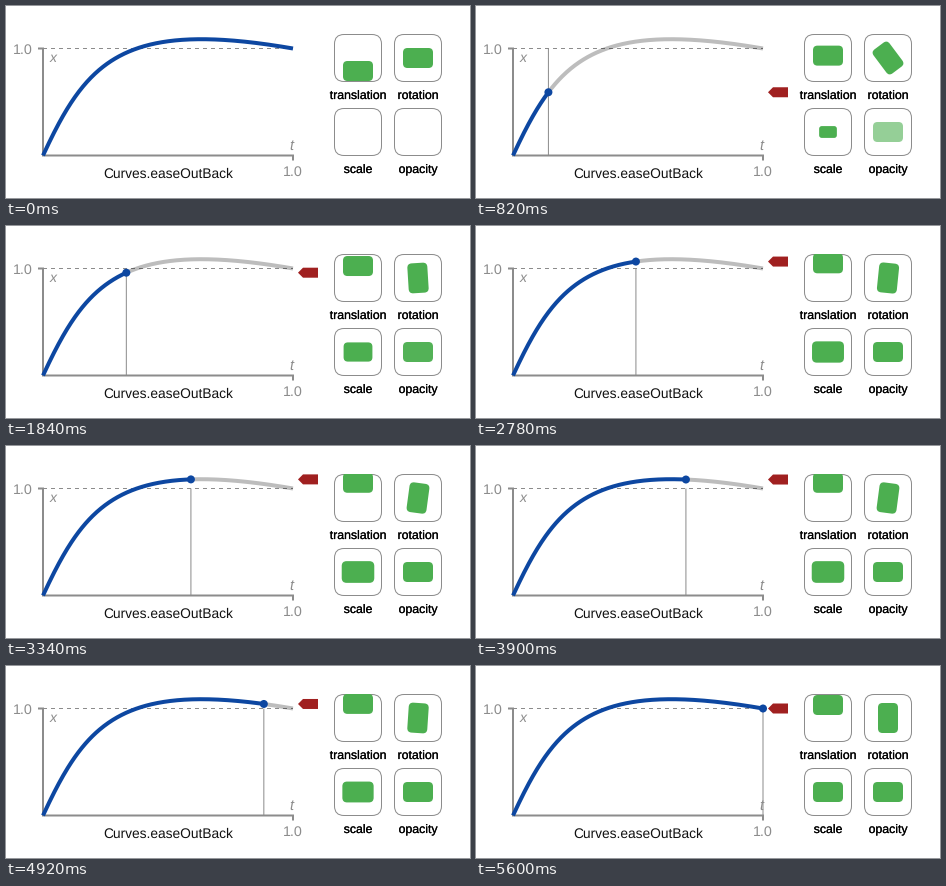
Write a matplotlib script that moves like this. It is 464x192 px and loops after 5620 ms.

```python
import numpy as np
import matplotlib.pyplot as plt
from matplotlib.animation import FuncAnimation
from matplotlib.patches import Circle, FancyBboxPatch, Polygon
from matplotlib.patheffects import withStroke
from matplotlib.transforms import Affine2D

W, H, DPI = 464, 192, 64
PX = 72 / DPI  # points per pixel
TICK = 20      # ms
STEPS = 120

GREY = "#8c8c8c"
SHADE = (0, 0, 0, 0.26)
BLUE = "#0d47a1"
RED = "#a02020"
GREEN = "#4caf50"

LEFT, RIGHT, TOP, BOTTOM = 37, 287, 42.5, 149.5
UNIT = 5

plt.rcParams["font.family"] = "Liberation Sans"
plt.rcParams["text.hinting"] = "none"

fig = plt.figure(figsize=(W / DPI, H / DPI), dpi=DPI, facecolor="white")
ax = fig.add_axes([0, 0, 1, 1])
ax.set(xlim=(0, W), ylim=(H, 0))
ax.axis("off")


def bezier(s, a, b):
    return 3 * (1 - s) ** 2 * s * a + 3 * (1 - s) * s ** 2 * b + s ** 3


S = np.linspace(0, 1, 2001)
CURVE_T = bezier(S, 0.175, 0.32)
CURVE_X = bezier(S, 0.885, 1.275)


def ease_out_back(t):
    return np.interp(t, CURVE_T, CURVE_X)


def to_area(t):
    return (LEFT + t * (RIGHT - LEFT),
            BOTTOM - ease_out_back(t) * (BOTTOM - TOP))


def line(xs, ys, color, width, z, **kw):
    return ax.plot(xs, ys, color=color, lw=width * PX, zorder=z, snap=False,
                   solid_capstyle="butt", **kw)[0]


def label(x, y, text, size, color, ha="center", **kw):
    return ax.text(x, y, text, fontsize=size * PX, color=color, ha=ha,
                   va="baseline", **kw)


def rounded(cx, cy, w, h, r, **kw):
    patch = FancyBboxPatch((cx - w / 2, cy - h / 2), w, h,
                           boxstyle=f"round,pad=0,rounding_size={r}", **kw)
    return ax.add_patch(patch)


def tile(cx, cy, name):
    """Framed cell with a caption; returns the green card inside it."""
    rounded(cx, cy, 47, 47, 9.5, fc="none", ec=GREY, lw=PX, zorder=4)
    bounds = rounded(cx, cy, 48, 48, 10, fc="none", ec="none")
    card = rounded(0, 0, 30, 20, 4.5, fc=GREEN, ec="none", zorder=5)
    card.set_clip_path(bounds)
    label(cx, cy + 41, name, 12.3, "black",
          path_effects=[withStroke(linewidth=0.2 * PX, foreground="black")])
    return card


# Axes, guide line and labels
line([LEFT - UNIT, LEFT, LEFT, RIGHT, RIGHT],
     [TOP, TOP, BOTTOM, BOTTOM, BOTTOM + UNIT], GREY, 2, 1,
     solid_joinstyle="miter")
dash_x = np.arange(LEFT, RIGHT, 8)
ax.hlines(np.full(dash_x.shape, TOP), dash_x, np.minimum(dash_x + 4, RIGHT),
          colors=GREY, lw=PX, zorder=1, snap=False)
label(27, 48, "1.0", 14.2, GREY, ha="right")
label(RIGHT, 170, "1.0", 14.2, GREY)
label(43.5, 55.5, "x", 14, GREY, ha="left", style="italic")
label(RIGHT, 144, "t", 14.5, GREY, ha="right", style="italic")
label(162, 171.7, "Curves.easeOutBack", 13.8, "#111111")

# Moving parts of the graph
pointer = line([], [], GREY, 1, 2)
rest = line([], [], SHADE, 4, 3)
done = line([], [], BLUE, 4, 4)
dot = ax.add_patch(Circle((0, 0), 4, fc=BLUE, ec="none", zorder=5))
marker = ax.add_patch(Polygon([(0, 0), (1, 1)], fc=RED, ec="none", zorder=3,
                              snap=False))

TILES = {
    "translation": (352, 52),
    "rotation": (412, 52),
    "scale": (352, 126),
    "opacity": (412, 126),
}
cards = {name: tile(*pos, name) for name, pos in TILES.items()}


def place(name, local):
    cards[name].set_transform(local.translate(*TILES[name]) + ax.transData)


def step_at(tick):
    # Each group of three steps lasts 20, 100 and 20 ms.
    group, part = divmod(tick, 7)
    return 3 * group + (part >= 1) + (part >= 6)


def draw(tick):
    t = step_at(tick) / STEPS
    value = float(ease_out_back(t))
    x, y = to_area(t)
    running = t > 0

    done.set_data(*to_area(np.linspace(0, t if running else 1, 251)))
    rest.set_data(*to_area(np.linspace(t, 1, 251)))
    pointer.set_data([x, x], [TOP, BOTTOM])
    dot.center = x, y
    tip, shoulder, end = RIGHT + UNIT, RIGHT + 2 * UNIT, RIGHT + 5 * UNIT
    marker.set_xy([(tip, y), (shoulder, y - UNIT), (end, y - UNIT),
                   (end, y + UNIT), (shoulder, y + UNIT)])
    for part in (rest, pointer, dot, marker, cards["scale"], cards["opacity"]):
        part.set_visible(running)

    place("translation", Affine2D().translate(0, 13 - 26 * value))
    place("rotation", Affine2D().rotate(value * np.pi / 2))
    place("scale", Affine2D().scale(max(value, 1e-3)))
    place("opacity", Affine2D())
    cards["opacity"].set_alpha(min(value, 1))
    return []


anim = FuncAnimation(fig, draw, frames=5620 // TICK, interval=TICK,
                     repeat=True, repeat_delay=0, blit=False)
plt.show()
```
